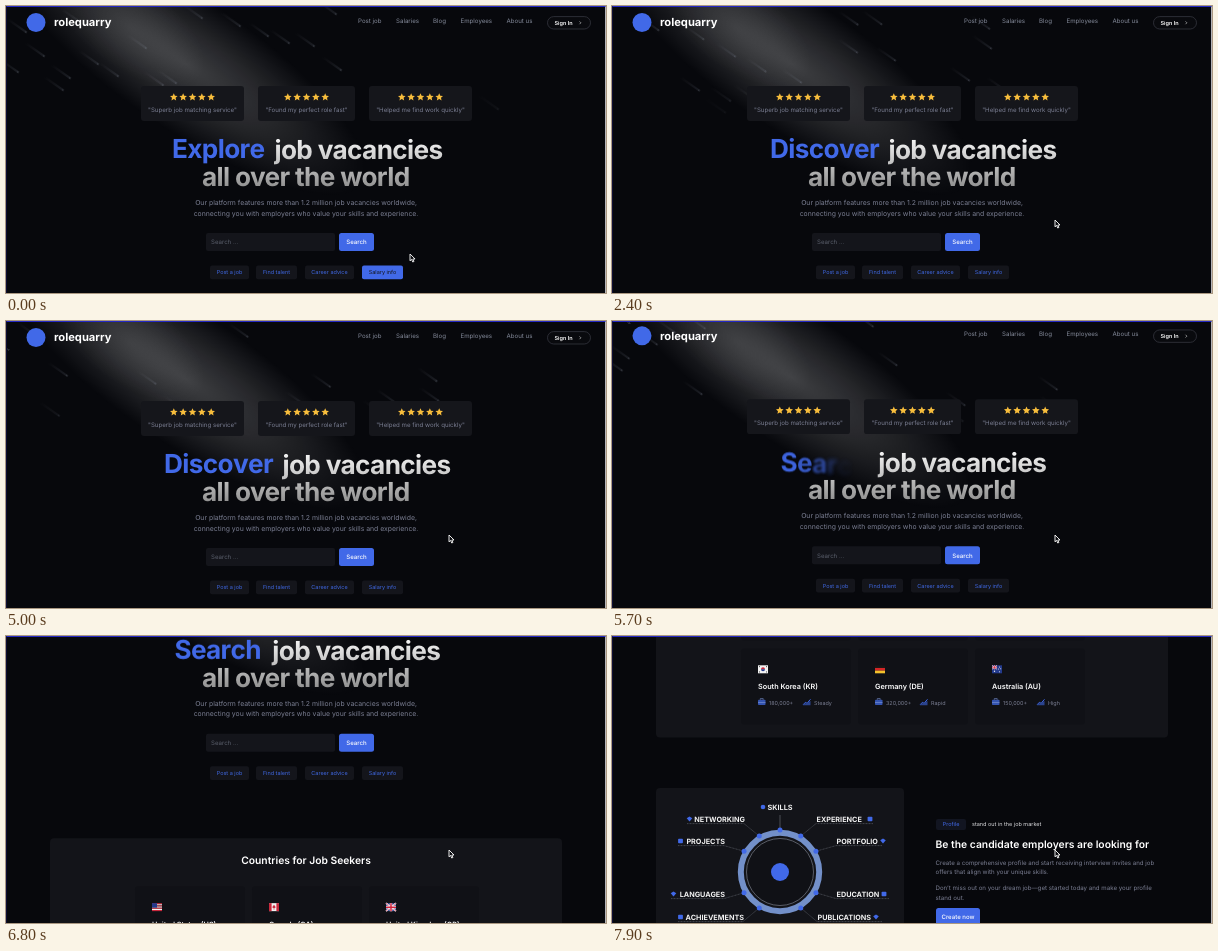
Write an HTML page that moves like this. It is 600 by 287 pixels and loops after 8000 ms.

```html
<!DOCTYPE html>
<html lang="en">
<head>
<meta charset="utf-8">
<title>Job vacancies</title>
<style>
html, body { margin: 0; width: 100%; height: 100%; overflow: hidden; background: #07080c; }
#stage { position: relative; width: 600px; height: 287px; overflow: hidden; font-family: Inter, "Open Sans", sans-serif; text-rendering: geometricPrecision; }
#page { position: absolute; inset: 0; animation: scroll 8s linear infinite; }
#page svg { position: absolute; left: 0; top: 0; font-family: inherit; white-space: pre; }
#edge { position: absolute; inset: 0; border: solid; border-width: 1px 1px 0; border-color: #2429c4 #b4b4b8 #14142e #0e0e36; }
#cursor { position: absolute; left: 0; top: 0; animation: point 8s infinite; }

.word { position: absolute; top: 128.6px; color: #4169e8; font: 700 26.2px/30px Inter, "Open Sans", sans-serif; letter-spacing: -.025em; white-space: nowrap; animation: 8s infinite; }
.word span { display: inline-block; }
.in span { animation: letter 8s calc(var(--start) + var(--i) * 80ms) infinite both; }
#w0 { left: 165.5px; animation-name: first; }
#w1 { left: 157.5px; animation-name: second; --start: 1360ms; }
#w2 { left: 168.5px; animation-name: third; --start: 5360ms; }
#rest { animation: shift 8s step-end infinite; }
.tight { letter-spacing: -.025em; }
.meteor { animation: fall linear infinite; }
#hot rect { animation: hot 8s infinite; }
#hot text { animation: hotText 8s infinite; }

@keyframes scroll {
  0%, 8.75% { transform: translateY(0); }
  11.25%, 15% { transform: translateY(-1px); }
  17.5%, 70% { transform: translateY(0); }
  71.25% { transform: translateY(-1.5px); }
  73.75% { transform: translateY(-32px); }
  76.25% { transform: translateY(-78px); }
  78.75% { transform: translateY(-108px); }
  81.25% { transform: translateY(-122px); }
  85% { transform: translateY(-129px); }
  87.5% { transform: translateY(-160px); }
  91.25% { transform: translateY(-285px); }
  95% { transform: translateY(-400px); }
  98.75%, 100% { transform: translateY(-451px); }
}
@keyframes point {
  0% { transform: translate(403px, 247px); }
  9%, 100% { transform: translate(442px, 213px); }
}
@keyframes first {
  0%, 17% { opacity: 1; transform: none; filter: blur(0); }
  20%, 100% { opacity: 0; transform: translate(16px, -16px) scale(2); filter: blur(3px); }
}
@keyframes second {
  0%, 16.999% { opacity: 0; transform: none; filter: blur(0); }
  17%, 67% { opacity: 1; transform: none; filter: blur(0); }
  70%, 100% { opacity: 0; transform: translate(16px, -16px) scale(2); filter: blur(3px); }
}
@keyframes third {
  0%, 66.999% { opacity: 0; }
  67%, 100% { opacity: 1; }
}
@keyframes letter {
  0% { opacity: 0; transform: translateY(4px); filter: blur(3.2px); animation-timing-function: ease-out; }
  5%, 70% { opacity: 1; transform: none; filter: blur(0); }
  70.01%, 100% { opacity: 0; transform: translateY(4px); filter: blur(3.2px); }
}
@keyframes shift {
  0% { transform: translateX(268.5px); }
  17% { transform: translateX(276.5px); }
  67% { transform: translateX(266.3px); }
}
@keyframes fall {
  0% { transform: translateX(0); opacity: 1; }
  70% { opacity: 1; }
  100% { transform: translateX(200px); opacity: 0; }
}
@keyframes hot {
  0%, 1.25% { fill: #4169e8; }
  3.5%, 100% { fill: #14151b; }
}
@keyframes hotText {
  0%, 1.25% { fill: #14151b; }
  3.5%, 100% { fill: #3f67e0; }
}
</style>
</head>
<body>
<div id="stage">
  <div id="page">
    <svg id="art" width="600" height="740" viewBox="0 0 600 740"></svg>
    <div class="word" id="w0">Explore</div>
    <div class="word in" id="w1">Discover</div>
    <div class="word in" id="w2">Search</div>
  </div>
  <div id="edge"></div>
  <svg id="cursor" width="8" height="11" viewBox="-1 -1 8 11">
    <path d="M0 0V6.8L1.6 5.4L2.7 8L3.9 7.5L2.8 5H5Z" fill="#08090d" stroke="#fff" stroke-width=".9"/>
  </svg>
</div>
<script>
const BLUE = '#4169e8', GREY = '#7b7f93', PANEL = '#15161b';

const rect = (x, y, w, h, fill, r = 2, more = '') =>
  `<rect x="${x}" y="${y}" width="${w}" height="${h}" rx="${r}" fill="${fill}" ${more}/>`;
const disc = (x, y, r, fill, more = '') =>
  `<circle cx="${x}" cy="${y}" r="${r}" fill="${fill}" ${more}/>`;
const line = (d, color, width, more = '') =>
  `<path d="${d}" fill="none" stroke="${color}" stroke-width="${width}" ${more}/>`;
const text = (x, y, s, size, fill, weight = 400, anchor = 'start', more = '') =>
  `<text x="${x}" y="${y}" font-size="${size}" fill="${fill}" font-weight="${weight}" text-anchor="${anchor}" ${more}>${s}</text>`;
const at = (x, y, body) => `<g transform="translate(${x} ${y})">${body}</g>`;

const defs = `<defs>
  <linearGradient id="tail"><stop offset="0" stop-color="#8b93a5" stop-opacity="0"/><stop offset="1" stop-color="#8b93a5" stop-opacity=".65"/></linearGradient>
  <linearGradient id="head" gradientUnits="userSpaceOnUse" x1="0" y1="130" x2="0" y2="187">
    <stop offset="0" stop-color="#fafafa"/><stop offset="1" stop-color="#858585"/></linearGradient>
  <radialGradient id="glow"><stop offset="0" stop-color="#fff" stop-opacity=".22"/><stop offset=".45" stop-color="#fff" stop-opacity=".13"/>
    <stop offset="1" stop-color="#fff" stop-opacity="0"/></radialGradient>
</defs>`;

const spotlight = `<ellipse rx="215" ry="66" fill="url(#glow)" transform="translate(180 58) rotate(34)"/>
  <ellipse rx="85" ry="42" fill="url(#glow)" opacity=".4" transform="translate(125 22) rotate(34)"/>`;

// Head positions at time zero; every duration divides the loop.
const heads = [[308, 40], [283, 37], [57, 84], [64, 72], [170, 77], [157, 79], [492, 103], [234, 20],
  [112, 70], [38, 50], [92, 58], [262, 30], [335, 64], [196, 12], [140, 42], [20, 26], [330, 8], [74, 16], [410, 96], [12, 66]];
const meteors = heads.map(([x, y], i) => {
  const turn = 35 * Math.PI / 180;
  const time = 8 / [1, 2, 1, 1, 3, 2, 1][i % 7];
  const done = y / (200 * Math.sin(turn));
  return `<g transform="translate(${x - y / Math.tan(turn)} 0) rotate(35)">
    <g class="meteor" style="animation-duration:${time}s;animation-delay:${-done * time}s">
    ${rect(-22, -.25, 22, .5, 'url(#tail)', 0)}${disc(0, 0, .5, '#7f8798')}</g></g>`;
}).join('');

const nav = disc(30, 16.5, 9.5, BLUE) + text(48, 20.3, 'rolequarry', 11.2, '#fff', 700) +
  [['Post job', 352], ['Salaries', 390], ['Blog', 427], ['Employees', 454.5], ['About us', 500.5]]
    .map(([s, x]) => text(x, 17, s, 6.15, '#858b9b')).join('') +
  rect(541.5, 10.6, 43, 12.4, '#090a0e', 6.2, 'stroke="#3b3d47" stroke-width=".7"') +
  text(548.5, 18.8, 'Sign In', 5.5, '#fff', 600) + line('M573.5 15.4l1.4 1.4l-1.4 1.4', '#ddd', .6);

const star = Array.from({ length: 10 }, (_, i) => {
  const a = (i * 36 - 90) * Math.PI / 180, r = i % 2 ? 1.9 : 4;
  return `${(r * Math.cos(a)).toFixed(2)},${(r * Math.sin(a)).toFixed(2)}`;
}).join(' ');
const reviews = [['Superb job matching service', 135, 103], ['Found my perfect role fast', 252, 97], ['Helped me find work quickly', 363, 103]]
  .map(([s, x, w]) => {
    const mid = x + w / 2;
    return rect(x, 80, w, 35, PANEL, 3) + text(mid, 105.8, `"${s}"`, 6.15, GREY, 400, 'middle') +
      [-2, -1, 0, 1, 2].map(k => at(mid + k * 9.35, 91.2, `<polygon points="${star}" fill="#f7bd3c"/>`)).join('');
  }).join('');

const chip = (s, x, w) => rect(x, 259.5, w, 13.7, '#14151b') + text(x + w / 2, 268.3, s, 5.5, '#3f67e0', 400, 'middle');
const hero = text(0, 152.7, 'job vacancies', 26.2, 'url(#head)', 700, 'start', 'id="rest" class="tight"') +
  text(299.8, 179.9, 'all over the world', 26.2, 'url(#head)', 700, 'middle', 'class="tight"') +
  text(300, 198.8, 'Our platform features more than 1.2 million job vacancies worldwide,', 6.87, GREY, 400, 'middle') +
  text(300, 209.6, 'connecting you with employers who value your skills and experience.', 6.87, GREY, 400, 'middle') +
  rect(200, 227, 129, 18, '#14151b') + text(205, 238.2, 'Search ...', 6.1, '#5b606d') +
  rect(333, 227, 35, 18, BLUE, 2.5) + text(350.5, 238.2, 'Search', 6.1, '#fff', 500, 'middle') +
  chip('Post a job', 204, 39) + chip('Find talent', 250, 41) + chip('Career advice', 299, 49) +
  `<g id="hot">${chip('Salary info', 356, 41)}</g>`;

const bars = colors => colors.map((c, i) => rect(0, i * 8 / colors.length, 10, 8 / colors.length, c, 0)).join('');
const cross = (w, h, s) => line(`M0 0L${w} ${h}M${w} 0L0 ${h}`, '#fff', 1.6 * s) + line(`M0 0L${w} ${h}M${w} 0L0 ${h}`, '#d0213a', .6 * s) +
  line(`M${w / 2} 0V${h}M0 ${h / 2}H${w}`, '#fff', 2.6 * s) + line(`M${w / 2} 0V${h}M0 ${h / 2}H${w}`, '#d0213a', 1.5 * s);
const R = '#c8283c', W = '#f2f2f2', N = '#233a8c';
const flags = {
  US: bars([R, W, R, W, R, W, R]) + rect(0, 0, 5, 4.5, N, 0),
  CA: bars([W]) + rect(0, 0, 2.6, 8, R, 0) + rect(7.4, 0, 2.6, 8, R, 0) + `<path d="M5 1.5L6.8 4L5.3 5.2V6.5H4.7V5.2L3.2 4Z" fill="${R}"/>`,
  GB: bars([N]) + cross(10, 8, 1),
  KR: bars([W]) + `<path d="M3 4a2 2 0 0 1 4 0z" fill="${R}"/><path d="M3 4a2 2 0 0 0 4 0z" fill="${N}"/>` +
    line('M1 1.8l1-.9M8 .9l1 .9M1 6.2l1 .9M8 7.1l1-.9', '#222', .8),
  DE: bars(['#161616', '#d32626', '#f3c22c']),
  AU: bars([N]) + cross(5, 4, .5) + disc(2.5, 6, .7, W) + [[7.5, 1.6], [6.4, 3.8], [8.7, 3.4], [7.5, 6.4]].map(p => disc(...p, .5, W)).join('')
};
const caseIcon = rect(0, -3.2, 7.5, 5.4, '#3454b0', .8) + line('M2.3 -3.2V-4.3H5.2V-3.2M0 -.4H7.5', '#7f95d6', .6);
const trendIcon = line('M0 2L2.4 -.6L4 .4L7.5 -3.6', BLUE, 1) + `<path d="M0 2.4V1.6L3 0L7.5 -2V2.4Z" fill="#2b448f"/>`;

const countries = [
  ['United States (US)', 'US', '450,000+', 'Rapid'], ['Canada (CA)', 'CA', '250,000+', 'Steady'], ['United Kingdom (GB)', 'GB', '300,000+', 'High'],
  ['South Korea (KR)', 'KR', '180,000+', 'Steady'], ['Germany (DE)', 'DE', '320,000+', 'Rapid'], ['Australia (AU)', 'AU', '150,000+', 'High']
].map(([name, code, jobs, pace], i) => at(129 + i % 3 * 117, 379.5 + (i > 2) * 84,
  rect(0, 0, 110, 76, '#101116', 3) + at(17, 16.8, flags[code]) + text(17, 40.3, name, 7.25, '#fff', 600) +
  at(17, 54.4, caseIcon) + text(28, 56.4, jobs, 5.45, GREY) +
  at(62, 54.4, trendIcon) + text(73, 56.4, pace, 5.45, GREY))).join('');
const seekers = rect(44, 331.5, 512, 221, '#131419', 4) +
  text(300, 357, 'Countries for Job Seekers', 10.3, '#fff', 600, 'middle') + countries;

// Wheel rows: left label, right label, height, outer and inner reach, node angle.
const rows = [['NETWORKING', 'EXPERIENCE', -53, 93, 35, -60], ['PROJECTS', 'PORTFOLIO', -31, 102, 55, -30],
  ['LANGUAGES', 'EDUCATION', 22, 109, 55, 30], ['ACHIEVEMENTS', 'PUBLICATIONS', 45, 102, 36, 60]];
const bit = (x, y, i) => i % 2 ? rect(x - 2.4, y - 2.2, 4.8, 4.4, BLUE, .8) :
  `<path d="M${x - 2.8} ${y - .7}L${x} ${y - 2.6}L${x + 2.8} ${y - .7}L${x} ${y + 2.6}Z" fill="${BLUE}"/>`;
const wheel = at(168, 687,
  disc(0, 0, 39.2, 'none', 'stroke="#7390c9" stroke-width="6"') +
  disc(0, 0, 33.5, '#101116', 'stroke="#8a8f9c" stroke-width=".6"') +
  disc(0, 0, 9, BLUE) +
  text(0, -62.4, 'SKILLS', 7.3, '#f2f2f2', 700, 'middle') + disc(-17, -65, 2.3, BLUE) +
  line('M0 -57V-42', '#70747f', .6) + disc(0, -42, 2.5, BLUE) +
  rows.map(([left, right, y, far, near, angle], i) => {
    const a = angle * Math.PI / 180, nx = 41.5 * Math.cos(a), ny = 41.5 * Math.sin(a), base = y + 4.6;
    return [-1, 1].map(s => line(`M${s * far} ${base}H${s * (near + 1)}L${s * nx} ${ny}`, '#70747f', .5, 'stroke-dasharray="1 .5"') + disc(s * nx, ny, 2.5, BLUE)).join('') +
      text(-near, y + 2.6, left, 7.25, '#f2f2f2', 700, 'end') + text(near + 1.5, y + 2.6, right, 7.25, '#f2f2f2', 700) +
      bit(2.5 - far, y, i) + bit([90, 103, 104, 96][i], y, i + 1);
  }).join(''));

const profile = rect(44, 603, 248, 150, '#131419', 4) + wheel +
  rect(324, 634, 30, 11, '#121521') + text(339, 641.4, 'Profile', 5.5, BLUE, 400, 'middle') +
  text(360, 641.2, 'stand out in the job market', 5.5, '#dcdcdf') +
  text(323.5, 663, 'Be the candidate employers are looking for', 10.35, '#fff', 600) +
  ['Create a comprehensive profile and start receiving interview invites and job', 'offers that align with your unique skills.',
    'Don’t miss out on your dream job—get started today and make your profile', 'stand out.']
    .map((s, i) => text(323.5, [679.7, 689.2, 705.2, 714.6][i], s, 6.15, GREY)).join('') +
  rect(324, 723, 44, 18, BLUE, 2.5) + text(346, 734, 'Create now', 6.05, '#fff', 500, 'middle');

document.getElementById('art').innerHTML = defs + spotlight + meteors + nav + reviews + hero + seekers + profile;
for (const word of document.querySelectorAll('.word'))
  word.innerHTML = [...word.textContent].map((c, i) => `<span style="--i:${i}">${c}</span>`).join('');
</script>
</body>
</html>
```
